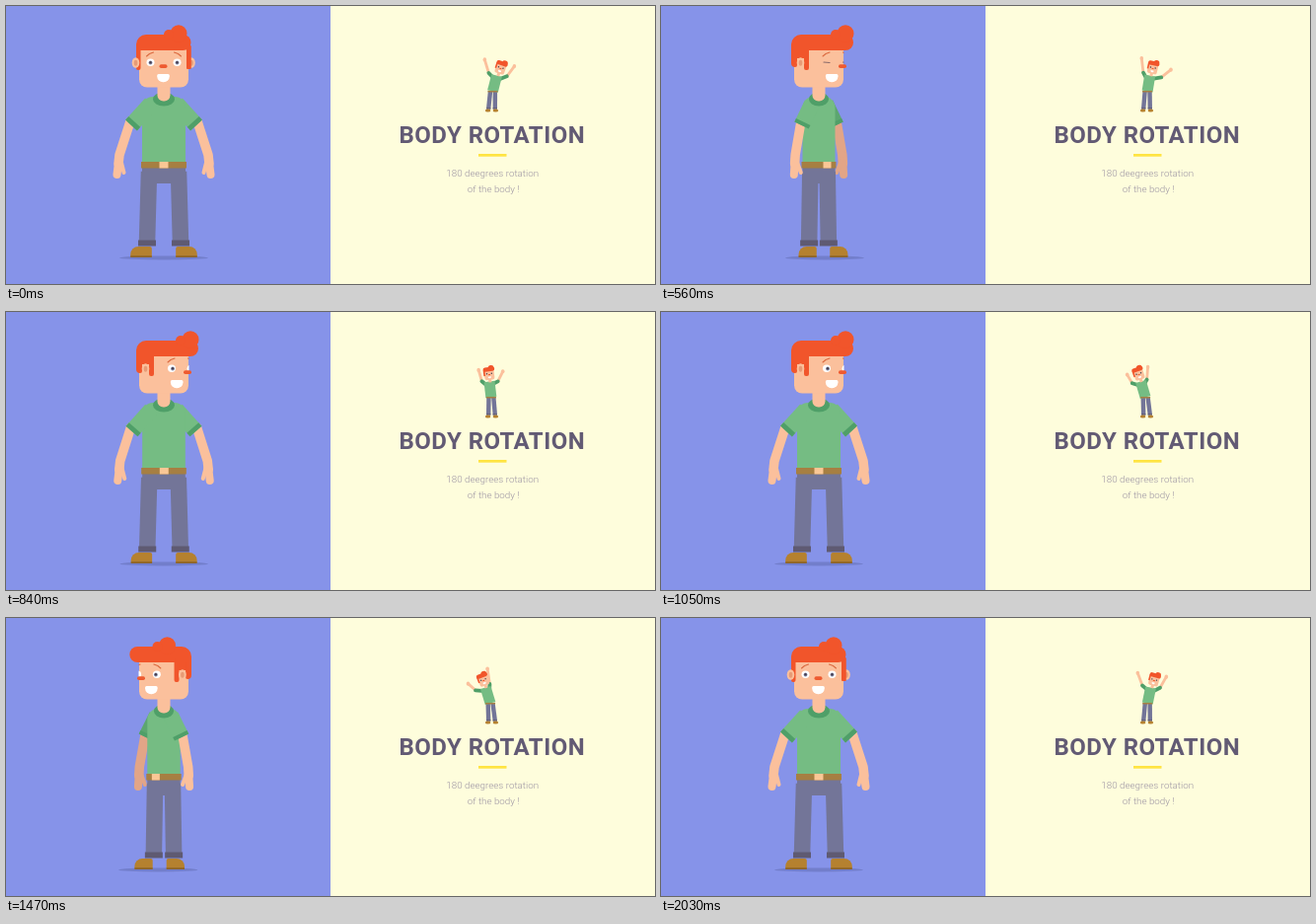
These frames come from a looping animation (658x282 px, 2.1 s). An HTML page with a canvas:

```html
<!DOCTYPE html>
<html lang="en">
<head>
<meta charset="utf-8">
<title>Body rotation</title>
<style>
  html, body { margin: 0; width: 100%; height: 100%; overflow: hidden; background: #fefddc; }
  svg, canvas { position: absolute; left: 0; top: 0; width: 658px; height: 282px; }
  text { font-family: Roboto, "Open Sans", sans-serif; text-anchor: middle; }
  .title { font-size: 24px; font-weight: 700; letter-spacing: .5px; fill: #625a74; }
  .sub { font-size: 9.8px; font-weight: 300; fill: #9c94a3; }
</style>
</head>
<body>
<svg viewBox="0 0 658 282">
  <rect width="658" height="282" fill="#fefddc"/>
  <rect width="329" height="282" fill="#8693e9"/>
  <text class="title" x="492.8" y="139">BODY ROTATION</text>
  <rect x="479" y="150" width="28.5" height="2.7" fill="#ffe442"/>
  <text class="sub" x="493.2" y="173">180 deegrees rotation</text>
  <text class="sub" x="494.2" y="189">of the body !</text>
</svg>
<canvas id="stage"></canvas>
<script>
const LOOP = 2100, STEP = 70;
const canvas = document.getElementById('stage');
const ctx = canvas.getContext('2d');
const dpr = window.devicePixelRatio || 1;
canvas.width = 658 * dpr;
canvas.height = 282 * dpr;

const HAIR = '#f1552b', SKIN = '#fbc09c', SKIN_DIM = '#e2a587', SHIRT = '#75bc83',
      SHIRT_DIM = '#5ca670', TRIM = '#4f9f68', PANTS = '#737598', HEM = '#5f5a72',
      BELT = '#a67f42', BUCKLE = '#fac795', SHOE = '#b5812f', SOLE = '#8d6429',
      SHADOW = '#727ecb', BROW = '#db6a40', DARK = '#4a3f4c';

const lerp = (a, b, k) => a + (b - a) * k;

// Eased progress from 0 to 1 between two times
function ease(t, from, to) {
  const k = Math.min(1, Math.max(0, (t - from) / (to - from)));
  return k * k * (3 - 2 * k);
}

// Turns: 1 is right, -1 is left. The head stays right while the body comes back.
const headTurn = t => ease(t, 0, 420) - 2 * ease(t, 1050, 1400) + ease(t, 1400, 1980);
const bodyTurn = t => ease(t, 0, 420) - ease(t, 560, 875) - ease(t, 1050, 1400) + ease(t, 1400, 1980);

function line(pts, color, width, cap = 'round') {
  ctx.beginPath();
  pts.forEach(([x, y]) => ctx.lineTo(x, y));
  ctx.lineCap = cap;
  ctx.strokeStyle = color;
  ctx.lineWidth = width;
  ctx.stroke();
}
function box(x0, y0, x1, y1, color, r = 0) {
  ctx.beginPath();
  ctx.roundRect(x0, y0, x1 - x0, y1 - y0, r);
  ctx.fillStyle = color;
  ctx.fill();
}
function oval(x, y, rx, ry, color) {
  ctx.beginPath();
  ctx.ellipse(x, y, rx, ry, 0, 0, 7);
  ctx.fillStyle = color;
  ctx.fill();
}
// Draws facing right around the body axis; a left turn is the mirror image
function facing(turn, draw) {
  ctx.save();
  ctx.translate(160, 0);
  if (turn < 0) ctx.scale(-1, 1);
  draw(Math.abs(turn));
  ctx.restore();
}

function drawArm(side, k, skin, cloth) {
  const w = side * (1 - .47 * k);
  const wrist = [45 * w, 151], tip = [47.5 * w, 171];
  const sleeveAt = f => [lerp(13, 33, f) * w, lerp(99, 121, f)];
  line([[34 * w, 117], wrist, [46 * w, 160]], skin, 9.5);
  line([wrist, tip], skin, 8);
  line([[44 * w, 155], [tip[0] - side * 7, 169]], skin, 4);
  line([sleeveAt(0), sleeveAt(1)], cloth, 16, 'butt');
  line([sleeveAt(.84), sleeveAt(1)], TRIM, 16, 'butt');
}

function drawLeg(side, k) {
  const w = side * (1 - .42 * k), ankle = 17 * w;
  const foot = ankle + side * 6 + 4.5 * k, half = 10.8 - 1.7 * k;
  const corners = foot < ankle ? [8, 2, 1, 1] : [2, 8, 1, 1];
  box(foot - half, 244, foot + half, 254.5, SHOE, corners);
  box(foot - half, 253.3, foot + half, 255, SOLE);
  line([[15 * w, 168], [ankle, 240]], PANTS, 16.5, 'butt');
  box(ankle - 9, 237.5, ankle + 9, 243.5, HEM);
}

function drawBody(k) {
  const half = 22 * (1 - .25 * k), buckle = 9 * k;
  oval(6 * k, 255.4, 45 - 5 * k, 2, SHADOW);
  drawArm(1, k, k > .2 ? SKIN_DIM : SKIN, k > .2 ? SHIRT_DIM : SHIRT);
  drawLeg(1, k);
  drawLeg(-1, k);
  box(-half, 164, half, 180, PANTS);
  box(-half, 92, half, 158.5, SHIRT, [11, 11, 0, 0]);
  box(-half - 1, 158, half + 1, 164.5, BELT);
  box(buckle - 4.5, 158, buckle + 4.5 - k, 164.5, BUCKLE);
  drawArm(-1, k, SKIN, SHIRT);
  oval(0, 94.5, 11 - k, 7, TRIM);
  box(-6.5, 78, 6.5, 96.5, SKIN, [0, 0, 6, 6]);
}

function drawEar(x) {
  oval(x, 57.5, 3.8, 5.3, SKIN);
  oval(x, 57.8, 1.8, 3, '#e79b76');
}

// inner: direction from the eye towards the nose
function drawEye(x, inner, look, open) {
  if (open) {
    oval(x, 57.2, 4, 3.7, '#fff');
    oval(x + look, 57.4, 1.9, 2, '#7d86a8');
    oval(x + look, 57.2, 1.1, 1.2, DARK);
  } else {
    line([[x - 3, 57], [x + 3, 57.5]], '#8a6a6a', 1.2);
  }
  line([[x - 4 * inner, 51], [x - inner, 48.5], [x + 3 * inner, 47]], BROW, 1.1);
}

function drawHead(k, open) {
  const tip = 27.5 + 7.5 * k, nose = 24.5 * k - .5, mouth = 13.7 * k - .5;

  // Far side, tucked behind the face as it turns away
  drawEar(28 - 9 * k);
  box(21 - 8 * k, 40, 27.5 - 8 * k, 64, HAIR, 1);
  box(-25, 38, 25, 82.5, SKIN, [4, 4, 8, 8]);
  if (k < .1) box(23, 40, 27.5, 64, HAIR, 1);

  ctx.save();
  ctx.beginPath();
  ctx.rect(-25, 38, 50.5, 44);
  ctx.clip();
  drawEye(-13.5 + 21.5 * k, 1, k, open);
  drawEye(13.5 + 14 * k, -1, k, open);
  ctx.restore();

  // Cap, side hair and sideburn
  box(-28, 29, tip, 45, HAIR, [10, 8, 8, 0]);
  box(-28, 40, -24 + 13 * k, 53, HAIR);
  box(-28, 45, -24 + 2 * k, 62, HAIR, [0, 0, 2, 4]);
  box(-28 + 13 * k, 45, -23.5 + 13.5 * k, 65, HAIR, [0, 0, 2, 2]);
  drawEar(-28.5 + 10 * k);

  box(nose - 4, 59.3, nose + 4, 63, '#ee5a30', 1.8);
  box(mouth - 6.3, 69, mouth + 6.3, 77.2, '#fff', [1.5, 1.5, 6, 6]);
}

function drawQuiff(turn) {
  const x = 175 + 12 * turn;
  oval(x, 28, 8.5, 8.8, HAIR);
  oval(x - 10, 29, 5, 5, HAIR);
}

function drawDancer(t) {
  const sway = phase => Math.cos(2 * Math.PI * (t - phase) / LOOP);
  const lean = sway(220);
  const headX = 493 + 11 * lean, chestX = 492 + 7 * lean, hipX = 492.3 + 1.5 * lean;

  for (const side of [-1, 1]) {
    const footX = 492.5 + side * 3.3;
    line([[hipX + side * 2.4, 86], [footX, 104]], PANTS, 4.4, 'butt');
    line([[footX - 2.2, 104], [footX + 2.2, 104]], HEM, 1.5, 'butt');
    oval(footX + side * .6, 106, 2.8, 1.6, SHOE);

    const hand = side < 0
      ? [479 + 11 * sway(320), 59 - 8 * sway(320)]
      : [504.5 + 17.5 * sway(300), 58.5 + 7 * sway(400)];
    const joint = [chestX + side * 4, 73 + side * lean];
    const elbow = [lerp(joint[0], hand[0], .38) + side, lerp(joint[1], hand[1], .35) + 2];
    line([elbow, hand], SKIN, 2.8);
    oval(...hand, 1.8, 2.1, SKIN);
    line([joint, elbow], TRIM, 3.8);
  }
  line([[chestX, 70.5], [hipX, 86.5]], SHIRT, 11, 'butt');
  line([[hipX - 5, 86.7], [hipX + 5, 86.7]], BELT, 1.5, 'butt');

  ctx.save();
  ctx.translate(headX, 62.5);
  ctx.rotate(.42 * lean);
  box(-1.5, 4, 1.5, 9, SKIN);
  box(-5, -5, 5, 6.3, SKIN, 2);
  box(-5.8, -6.5, 5.8, -2.3, HAIR, 2);
  box(-5.8, -4, -4.2, 2, HAIR);
  oval(2.5, -6, 2.8, 2.2, HAIR);
  for (const x of [-2.4, 2.4]) oval(x, 0, .7, .7, DARK);
  box(-1, .5, 1, 1.6, HAIR);
  box(-1.6, 3, 1.6, 4.8, '#fff', [0, 0, 1.5, 1.5]);
  ctx.restore();
}

function render(now) {
  const t = Math.floor(now % LOOP / STEP) * STEP;
  const head = headTurn(t), open = Math.abs(t - 560) > 50;
  ctx.setTransform(dpr, 0, 0, dpr, 0, 0);
  ctx.clearRect(0, 0, 658, 282);
  ctx.lineJoin = 'round';
  facing(bodyTurn(t), drawBody);
  facing(head, k => drawHead(k, open));
  drawQuiff(head);
  drawDancer(t);
}

const start = performance.now();
function tick() {
  render(performance.now() - start);
  requestAnimationFrame(tick);
}
tick();
</script>
</body>
</html>
```
